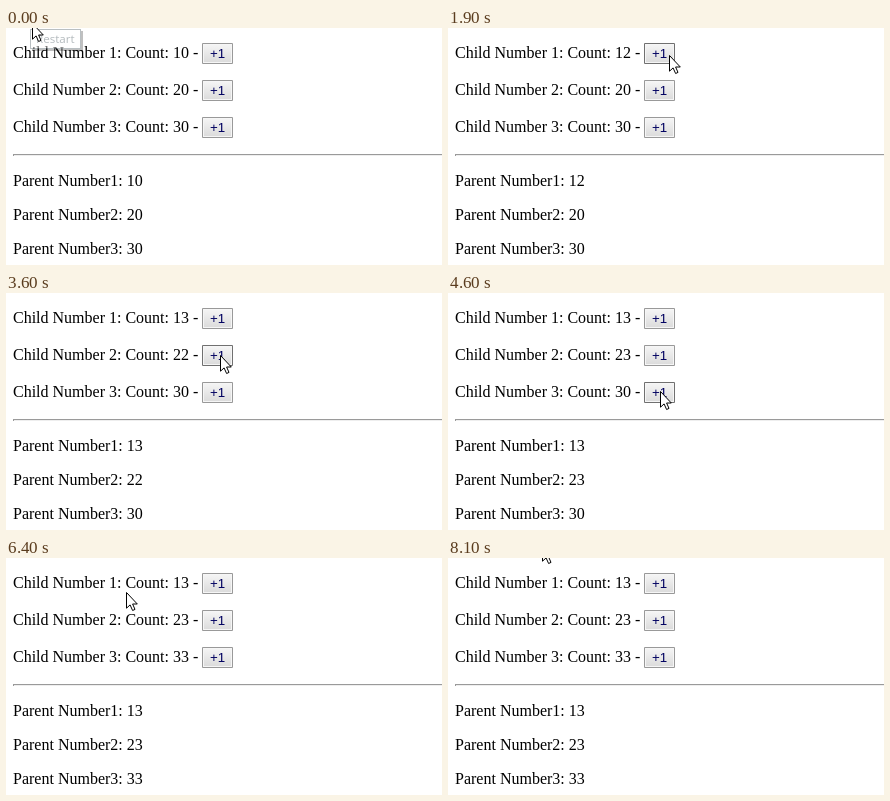
Recreate the animation shown at these times as an HTML page. Size 436x237 px, loop 8.2 s.

```html
<!DOCTYPE html>
<html lang="en">
<head>
<meta charset="utf-8">
<title>Counters</title>
<style>
  html, body { margin: 0; width: 436px; height: 237px; overflow: hidden; background: #fff; }
  svg { display: block; }
  text { white-space: pre; }
  .line { font: 16px "Liberation Serif", "Times New Roman", serif; fill: #000; }
  .label { font: 13.33px "Liberation Sans", Arial, sans-serif; fill: #000060; }
  .tip text { font: 11.6px "Open Sans", "Noto Sans", sans-serif; fill: #5c6a72; }
</style>
</head>
<body>
<svg id="stage" width="436" height="237" viewBox="0 0 436 237">
  <defs>
    <linearGradient id="normal" x2="0" y2="1">
      <stop offset="0" stop-color="#f4f4f4"/><stop offset="1" stop-color="#dcdcdc"/>
    </linearGradient>
    <linearGradient id="down" x2="0" y2="1">
      <stop offset="0" stop-color="#d4d4d4"/><stop offset="1" stop-color="#e6e6e6"/>
    </linearGradient>
  </defs>
</svg>
<script>
const LOOP = 8200, STEP = 100, HOLD = 200;
const stage = document.getElementById('stage');

// the cursor rests between these moves
const moves = [
  { from: 0, to: 600, x: 216, y: 25 },
  { from: 700, to: 900, x: 221, y: 30 },
  { from: 1000, to: 1500, x: 221, y: 27 },
  { from: 2300, to: 2500, x: 226, y: 52 },
  { from: 2600, to: 2900, x: 214, y: 62 },
  { from: 4100, to: 4600, x: 212, y: 98 },
  { from: 5900, to: 6800, x: 54, y: -12 },
  { from: 7200, to: 7500, x: 94, y: -13 }
];

// each button is clicked three times at an even pace
const paces = [
  { first: 1500, gap: 400 },
  { first: 3100, gap: 450 },
  { first: 4900, gap: 350 }
];

function add(parent, tag, attrs, content) {
  const el = document.createElementNS('http://www.w3.org/2000/svg', tag);
  for (const key in attrs) el.setAttribute(key, attrs[key]);
  if (content) el.textContent = content;
  parent.appendChild(el);
  return el;
}

function rect(parent, x, y, width, height, fill, extra) {
  return add(parent, 'rect', { x, y, width, height, fill, ...extra });
}

const rows = paces.map(({ first, gap }, i) => {
  const top = 15 + 37 * i;
  const child = add(stage, 'text', { class: 'line', x: 7, y: top + 15 });
  const parent = add(stage, 'text', { class: 'line', x: 7, y: 158 + 34 * i });
  const edge = rect(stage, 196, top, 31, 21, '#999', { rx: 1 });
  rect(stage, 197, top + 1, 29, 19, '#f6f6f6');
  const face = rect(stage, 198, top + 2, 27, 17, 'url(#normal)');
  add(stage, 'text', { class: 'label', x: 204, y: top + 15 }, '+1');
  const clicks = [0, 1, 2].map(k => first + k * gap);
  return { clicks, top, child, parent, edge, face, n: i + 1 };
});

rect(stage, 7, 126, 429, 2, '#9a9a9a');
rect(stage, 8, 127, 428, 1, '#eee');

function tooltip(x, y, w, label) {
  const g = add(stage, 'g', { class: 'tip' });
  rect(g, x + 2, y + 2, w, 20, '#000', { opacity: 0.55 });
  rect(g, x + 0.5, y + 0.5, w - 1, 19, '#fff', { stroke: '#66737a' });
  add(g, 'text', { x: x + 6, y: y + 14 }, label);
  return g;
}

const restart = tooltip(24, 1, 51, 'Restart');
const pause = tooltip(54, 7, 46, 'Pause');

const cursor = add(stage, 'path', {
  d: 'M.5 .5V16.2L4.1 12.9L6.6 18.5L9 17.4L6.6 12H11.3Z',
  fill: '#fff', stroke: '#000'
});

function ramp(t, from, to) {
  return Math.min(1, Math.max(0, (t - from) / (to - from)));
}

function cursorAt(t) {
  let x = 26, y = -5;
  for (const m of moves) {
    const k = ramp(t, m.from, m.to), ease = k * k * (3 - 2 * k);
    x += (m.x - x) * ease;
    y += (m.y - y) * ease;
  }
  return [Math.round(x), Math.round(y)];
}

function render(time) {
  const t = Math.floor((time % LOOP) / STEP) * STEP;
  const [x, y] = cursorAt(t);
  cursor.setAttribute('transform', `translate(${x} ${y})`);

  for (const row of rows) {
    const count = row.n * 10 + row.clicks.filter(c => t >= c).length;
    const pressed = row.clicks.some(c => t >= c - HOLD && t < c);
    const hover = x >= 196 && x < 227 && y >= row.top && y < row.top + 21;
    row.child.textContent = `Child Number ${row.n}: Count: ${count} - `;
    row.parent.textContent = `Parent Number${row.n}: ${count}`;
    row.edge.setAttribute('fill', pressed ? '#555' : hover ? '#707070' : '#999');
    row.face.setAttribute('fill', pressed ? 'url(#down)' : 'url(#normal)');
  }

  restart.setAttribute('opacity', 0.45 * (1 - ramp(t, 0, 200)));
  pause.setAttribute('opacity', ramp(t, 6900, 7100) * (1 - ramp(t, 7200, 7500)));
}

const start = performance.now();
function tick() {
  render(performance.now() - start);
  requestAnimationFrame(tick);
}
tick();
</script>
</body>
</html>
```
